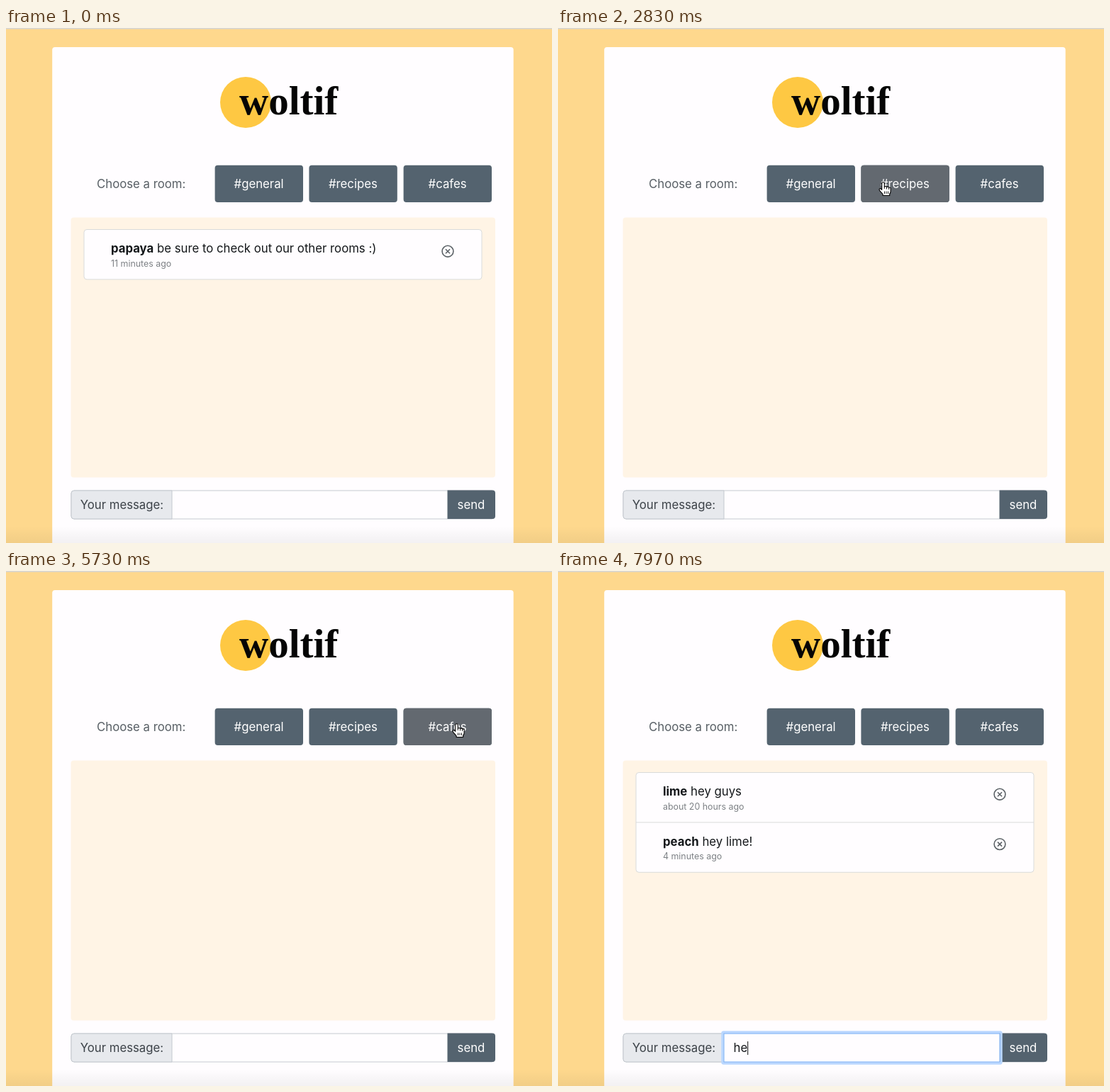
Write an HTML page that moves like this. It is 770x727 px and loops after 8000 ms.

```html
<!DOCTYPE html>
<html lang="en">
<head>
<meta charset="utf-8">
<title>Chat rooms</title>
<style>
  html, body { margin: 0; width: 100%; height: 100%; overflow: hidden; background: #fed88d; }
  svg { display: block; width: 770px; height: 727px; }
  text { font: 16.75px Inter, sans-serif; fill: #14171a; white-space: pre; }
  .small { font-size: 12.4px; fill: #7d8185; }
  .bold { font-weight: 700; }
  .light { fill: #fff; text-anchor: middle; }
  .brand { font: bold 57px "Liberation Serif", serif; fill: #050505; }
  .dark { fill: #54636f; }
  .card { fill: #fffdff; stroke: #d9dbda; }
  .icon { fill: none; stroke: #5c6267; stroke-width: 1.6; }
</style>
</head>
<body>
<svg viewBox="0 0 770 727">
  <defs>
    <linearGradient id="shade" x2="0" y2="1">
      <stop offset="0" stop-opacity="0"/><stop offset="1" stop-opacity=".05"/>
    </linearGradient>
  </defs>
  <rect width="770" height="727" fill="#fed88d"/>
  <rect width="770" height="1.5" fill="#d6d5d3"/>
  <rect x="65.2" y="27" width="650.5" height="720" rx="4" fill="#fffdff"/>
  <circle cx="338" cy="105" r="36" fill="#fec843"/>
  <text class="brand" x="329" y="121.5">woltif</text>
  <text x="128" y="226.3" style="fill:#575e64">Choose a room:</text>
  <g id="buttons"></g>
  <rect x="91.5" y="267.5" width="598.5" height="367" rx="4" fill="#fff4e5"/>
  <g id="rooms"></g>
  <rect x="92" y="653" width="597" height="40" rx="4" fill="#fffdff" stroke="#c6cbd0"/>
  <path d="M234 653V693H96a4 4 0 0 1-4-4V657a4 4 0 0 1 4-4Z" fill="#e7e9ed" stroke="#c3c8ce"/>
  <text x="104.7" y="679" style="fill:#3c4248">Your message:</text>
  <path class="dark" d="M622.5 652.5H686a4 4 0 0 1 4 4V689a4 4 0 0 1-4 4H622.5Z"/>
  <text class="light" x="656" y="679">send</text>
  <g id="focus">
    <rect x="232" y="651" width="393" height="44" rx="1.5" fill="none" stroke="#bad7ff" stroke-width="3.4"/>
    <rect x="234" y="653" width="389" height="40" fill="#fffdff" stroke="#78b0f8"/>
  </g>
  <text id="typed" x="247.5" y="679"></text>
  <path id="caret" d="M0 664V683" stroke="#222" stroke-width="1.1"/>
  <rect y="703" width="770" height="24" fill="url(#shade)"/>
  <g id="cursor">
    <path id="arrow" d="M0 0V16.3L3.7 12.8 6.3 18.7 9 17.5 6.4 11.8H11.6Z" fill="#000" stroke="#fff" stroke-width="1.2"/>
    <g id="hand" stroke="#000" stroke-width="1.1" stroke-linejoin="round">
      <path fill="#fff" d="M-1.8 10V1.5a1.8 1.8 0 0 1 3.6 0V6.5a1.7 1.7 0 0 1 3.2.2 1.7 1.7 0 0 1 3 .7 1.6 1.6 0 0 1 2.6 1.2V12.5q0 2-1.4 3.5V18.5H-.4V16.6L-4.8 11.6q-1.4-2.2.3-2.9 1.4-.4 2.7 1.7Z"/>
      <path d="M1.8 6.5V9M5 7V9.5M8 8V10M2 12.5V16M4.5 12.5V16M7 12.5V16" stroke-width=".9"/>
    </g>
    <path id="beam" d="M-3-8.5Q0-8.5 0-6.5 0-8.5 3-8.5M0-7V7M-3 8.5Q0 8.5 0 6.5 0 8.5 3 8.5M-2 3H2" fill="none" stroke="#222" stroke-width="1.2"/>
  </g>
</svg>
<script>
const $ = id => document.getElementById(id);
const show = (id, visible) => $(id).setAttribute('visibility', visible ? 'visible' : 'hidden');
const clamp = v => Math.max(0, Math.min(1, v));
const within = (t, from, to) => t >= from && t < to;

const buttons = [['general', 294.6], ['recipes', 427.4], ['cafes', 560.6]];
$('buttons').innerHTML = buttons.map(([name, x]) => `
  <rect class="dark" x="${x}" y="193.8" width="124.4" height="52.1" rx="4"/>
  <rect id="hover-${name}" x="${x}" y="193.8" width="124.4" height="52.1" rx="4" fill="#636970" opacity="0"/>
  <text class="light" x="${x + 62}" y="226.3">#${name}</text>`).join('');

const rooms = {
  general: [['papaya', 'be sure to check out our other rooms :)', '11 minutes ago']],
  recipes: [
    ['papaya', "what's your fave muffin topping?", '3 minutes ago'],
    ['papaya', "for me - it's gotta be choco papaya", '2 minutes ago'],
    ['muffin-fan', 'blueberries all the way!', '2 minutes ago']
  ],
  cafes: [
    ['lime', 'hey guys', 'about 20 hours ago'],
    ['peach', 'hey lime!', '4 minutes ago']
  ]
};
const PITCH = 70.4;
const message = ([user, body, age], i) => {
  const y = 284.5 + i * PITCH;
  return `${i ? `<path class="card" d="M110 ${y}H671"/>` : ''}
    <text x="148" y="${y + 32.7}"><tspan class="bold">${user}</tspan> ${body}</text>
    <text class="small" x="148" y="${y + 52.5}">${age}</text>
    <g class="icon" transform="translate(623 ${y + 30.7})">
      <circle r="7.9"/><path d="M-3-3 3 3M3-3-3 3"/>
    </g>`;
};
$('rooms').innerHTML = Object.entries(rooms).map(([name, list]) => `
  <g id="room-${name}">
    <rect class="card" x="110" y="284.5" width="561" height="${list.length * PITCH}" rx="4"/>
    ${list.map(message).join('')}
  </g>`).join('');

// Pointer stops: time, x, y
const path = [
  [230, 748, 400], [1030, 546, 294], [1250, 447, 243], [1430, 447, 243],
  [1630, 462, 226], [1820, 462, 226], [1980, 458.5, 218], [4330, 458.5, 218],
  [5070, 635.5, 216], [5900, 635.5, 216], [6510, 292, 602], [6580, 292, 602], [6960, 288, 673]
];
function pointer(t) {
  const next = path.findIndex(p => p[0] > t);
  if (next < 1) return path[next ? path.length - 1 : 0].slice(1);
  const [t0, x0, y0] = path[next - 1], [t1, x1, y1] = path[next];
  let u = (t - t0) / (t1 - t0);
  if (t > 1030) u *= u * (3 - 2 * u);
  return [x0 + (x1 - x0) * u, y0 + (y1 - y0) * u];
}
const fade = (t, from, to) => clamp((t - from) / 150) - clamp((t - to) / 150);

function draw(t) {
  show('room-general', t < 2770);
  show('room-recipes', within(t, 2890, 5730));
  show('room-cafes', t >= 5870);

  $('hover-recipes').setAttribute('opacity', fade(t, 1840, 4710));
  $('hover-cafes').setAttribute('opacity', fade(t, 4745, 6005));

  const [x, y] = pointer(t);
  $('cursor').setAttribute('transform', `translate(${x} ${y})`);
  const moving = within(t, 230, 7560);
  const hand = within(t, 1840, 4710) || within(t, 4745, 6005);
  const beam = y > 653;
  show('hand', moving && hand);
  show('beam', moving && beam);
  show('arrow', moving && !hand && !beam);

  $('focus').setAttribute('opacity', clamp((t - 7180) / 150));
  $('typed').textContent = 'he'.slice(0, (t >= 7560) + (t >= 7760));
  const caretX = 248 + $('typed').getComputedTextLength();
  $('caret').setAttribute('transform', `translate(${caretX})`);
  show('caret', t >= 7180);
}
function tick() {
  draw(performance.now() % 8000);
  requestAnimationFrame(tick);
}
tick();
</script>
</body>
</html>
```
